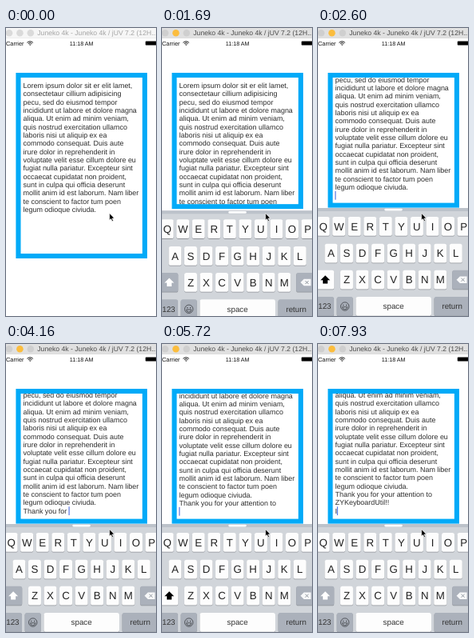
These frames come from a looping animation (188x360 px, 8 s). An HTML page with a canvas:

```html
<!DOCTYPE html>
<html lang="en">
<head>
<meta charset="utf-8">
<title>Keyboard avoidance</title>
<style>
html, body { margin: 0; width: 188px; height: 360px; overflow: hidden; background: #fff; }
canvas { display: block; width: 188px; height: 360px; }
</style>
</head>
<body>
<canvas></canvas>
<script>
const W = 188, H = 360, LOOP = 8000, STEP = 130;
const SANS = '"Liberation Sans", Arial, sans-serif';
const PITCH = 19.55, LINE = 10.33;
const PASSAGE = `Lorem ipsum dolor sit er elit lamet,
consectetaur cillium adipisicing
pecu, sed do eiusmod tempor
incididunt ut labore et dolore magna
aliqua. Ut enim ad minim veniam,
quis nostrud exercitation ullamco
laboris nisi ut aliquip ex ea
commodo consequat. Duis aute
irure dolor in reprehenderit in
voluptate velit esse cillum dolore eu
fugiat nulla pariatur. Excepteur sint
occaecat cupidatat non proident,
sunt in culpa qui officia deserunt
mollit anim id est laborum. Nam liber
te conscient to factor tum poen
legum odioque civiuda.`;
const TYPED = '\nThank you for your attention to\nZYKeyboardUtil!!\nI';
// [time, characters typed so far]
const TYPING = [[0, 0], [2470, 0], [2600, 1], [2990, 1], [3120, 2], [3900, 11], [4160, 15],
  [4810, 23], [5590, 32], [5720, 33], [5850, 34], [6630, 43], [7540, 49], [7670, 49],
  [7800, 50], [7930, 51]];
// [start, distance, stiffness]
const SCROLLS = [[1690, 18.2, 18], [2470, LINE, 35], [5590, LINE, 35], [7670, LINE, 35]];

const canvas = document.querySelector('canvas');
const ctx = canvas.getContext('2d');
const scale = window.devicePixelRatio || 1;
canvas.width = W * scale;
canvas.height = H * scale;

// Critically damped approach from 0 to 1
function settle(ms, k) {
  const x = Math.max(0, ms) / 1000 * k;
  return 1 - Math.exp(-x) * (1 + x);
}

function typedCount(t) {
  const i = TYPING.findIndex(p => p[0] > t);
  if (i < 0) return TYPED.length;
  const [t0, n0] = TYPING[i - 1], [t1, n1] = TYPING[i];
  return Math.round(n0 + (n1 - n0) * (t - t0) / (t1 - t0));
}

function text(str, x, y, size, color = '#000', align = 'left') {
  ctx.font = `${size}px ${SANS}`;
  ctx.fillStyle = color;
  ctx.textAlign = align;
  ctx.fillText(str, x, y);
}

function rect(x, y, w, h, color) {
  ctx.fillStyle = color;
  ctx.fillRect(x, y, w, h);
}

function round(x, y, w, h, r, color) {
  ctx.fillStyle = color;
  ctx.beginPath();
  ctx.roundRect(x, y, w, h, r);
  ctx.fill();
}

function dot(x, y, r, color) {
  ctx.fillStyle = color;
  ctx.beginPath();
  ctx.arc(x, y, r, 0, 7);
  ctx.fill();
}

function shape(points, fill, stroke) {
  ctx.beginPath();
  points.forEach(p => ctx.lineTo(...p));
  ctx.closePath();
  ctx.fillStyle = fill;
  ctx.fill();
  if (stroke) {
    ctx.strokeStyle = stroke;
    ctx.lineWidth = 0.7;
    ctx.stroke();
  }
}

function titleBar(active) {
  rect(0, 0, W, 12.4, active ? '#e0e0e0' : '#f6f6f6');
  rect(0, 12, W, 0.5, active ? '#c8c8c8' : '#dedede');
  const lights = active ? ['#cfcfcf', '#fbbd3e', '#cfcfcf'] : Array(3).fill('#dadada');
  lights.forEach((c, i) => dot(4 + i * 13.4, 6.2, 4.3, c));
  text('Juneko 4k - Juneko 4k / jUV 7.2 (12H...', 39.3, 9.3, 8.65, active ? '#4a4a4a' : '#a4a4a4');
}

function statusBar() {
  text('Carrier', 0, 21.7, 7.4, '#111');
  text('11:18 AM', 94.6, 21.7, 7.15, '#111', 'center');
  ctx.strokeStyle = '#111';
  ctx.lineWidth = 1;
  for (const r of [3.3, 5.2]) {
    ctx.beginPath();
    ctx.arc(30.2, 22, r, -2.36, -0.78);
    ctx.stroke();
  }
  shape([[30.2, 22], [28.9, 20.4], [31.5, 20.4]], '#111');
  round(174.8, 16.6, 14, 4.9, 0.8, '#000');
}

function textBox(t, bottom) {
  rect(12.4, 56, 164.6, bottom - 56, '#00aaf8');
  const top = 62, height = bottom - 6 - top;
  rect(18.5, top, 152.4, height, '#fff');
  ctx.save();
  ctx.beginPath();
  ctx.rect(18.5, top, 152.4, height);
  ctx.clip();
  const scroll = SCROLLS.reduce((sum, [t0, d, k]) => sum + d * settle(t - t0, k), 0);
  const lines = (PASSAGE + TYPED.slice(0, typedCount(t))).split('\n');
  const baseline = i => 74.9 + i * LINE - scroll;
  lines.forEach((line, i) => text(line, 21.5, baseline(i), 8.96, '#2c2c2c'));
  if (t > 1300) {
    const end = 21.3 + ctx.measureText(lines.at(-1)).width;
    rect(end, baseline(lines.length - 1) - 8.4, 1.1, 10.8, '#4a6be0');
  }
  ctx.restore();
}

function key(x, y, w, color = '#fdfdfd') {
  round(x, y - 11.4, w, 24, 2.6, '#8f9298');
  round(x, y - 12, w, 23.8, 2.6, color);
}

function letterRow(letters, y) {
  [...letters].forEach((ch, i) => {
    const x = 94 + (i - (letters.length - 1) / 2) * PITCH;
    key(x - 8, y, 16);
    text(ch, x, y + 4.7, 13.3, '#222', 'center');
  });
}

function smiley(x, y) {
  ctx.strokeStyle = '#3a3d42';
  ctx.lineWidth = 0.8;
  ctx.beginPath();
  ctx.arc(x, y, 5.2, 0, 7);
  ctx.stroke();
  for (const side of [-1.9, 1.9]) dot(x + side, y - 1.6, 0.7, '#3a3d42');
  ctx.beginPath();
  ctx.arc(x, y + 0.7, 3.1, 0, Math.PI);
  ctx.closePath();
  ctx.stroke();
}

function keyboard(dy, shifted) {
  const GREY = '#abb1bb';
  ctx.save();
  ctx.translate(0.6, dy);
  rect(-2, 225, W + 4, 135, '#d1d5da');
  rect(-2, 225, W + 4, 4, '#bcc2ca');
  round(82.7, 225.8, 22.5, 2.6, 1.3, '#fff');
  letterRow('QWERTYUIOP', 248);
  letterRow('ASDFGHJKL', 281.7);
  letterRow('ZXCVBNM', 314.7);

  key(-3, 314.7, 22.6, shifted ? '#fdfdfd' : GREY);
  shape([[8.5, 309.3], [14.5, 315.2], [11.5, 315.2], [11.5, 319.6], [5.5, 319.6], [5.5, 315.2],
    [2.5, 315.2]], shifted ? '#000' : '#fff');
  key(167.6, 314.7, 23, GREY);
  shape([[173, 314.7], [177.3, 310.4], [186, 310.4], [186, 319], [177.3, 319]], '#f7f8f9');
  ctx.strokeStyle = '#8f959e';
  ctx.lineWidth = 1;
  ctx.beginPath();
  for (const s of [-1, 1]) {
    ctx.moveTo(179, 314.7 - 2 * s);
    ctx.lineTo(183, 314.7 + 2 * s);
  }
  ctx.stroke();

  key(-3, 348, 22.4, GREY);
  text('123', 7.8, 351.4, 9.8, '#333', 'center');
  key(23, 348, 20.2, GREY);
  smiley(33.1, 348);
  key(46.8, 348, 94.6);
  text('space', 94, 351.2, 9.8, '#333', 'center');
  key(145, 348, 46, GREY);
  text('return', 167.6, 351.2, 9.8, '#333', 'center');
  ctx.restore();
}

function pointer() {
  shape([[129.7, 231.5], [129.7, 240.3], [131.6, 238.6], [133, 241.8], [134.5, 241.1],
    [133.1, 238], [135.8, 237.8]], '#000', '#fff');
}

function draw(t) {
  ctx.setTransform(scale, 0, 0, scale, 0, 0);
  ctx.textRendering = 'geometricPrecision';
  rect(0, 0, W, H, '#fff');
  const rise = settle(t - 1430, 21.5);
  const last = TYPED[typedCount(t) - 1];
  titleBar(t >= 1300);
  statusBar();
  textBox(t, 288 - 63.4 * rise);
  if (rise > 0) keyboard(135 * (1 - rise), last === '\n');
  pointer();
}

const start = performance.now();
function tick() {
  const t = (performance.now() - start) % LOOP;
  draw(Math.floor(t / STEP) * STEP);
  requestAnimationFrame(tick);
}
tick();
</script>
</body>
</html>
```
